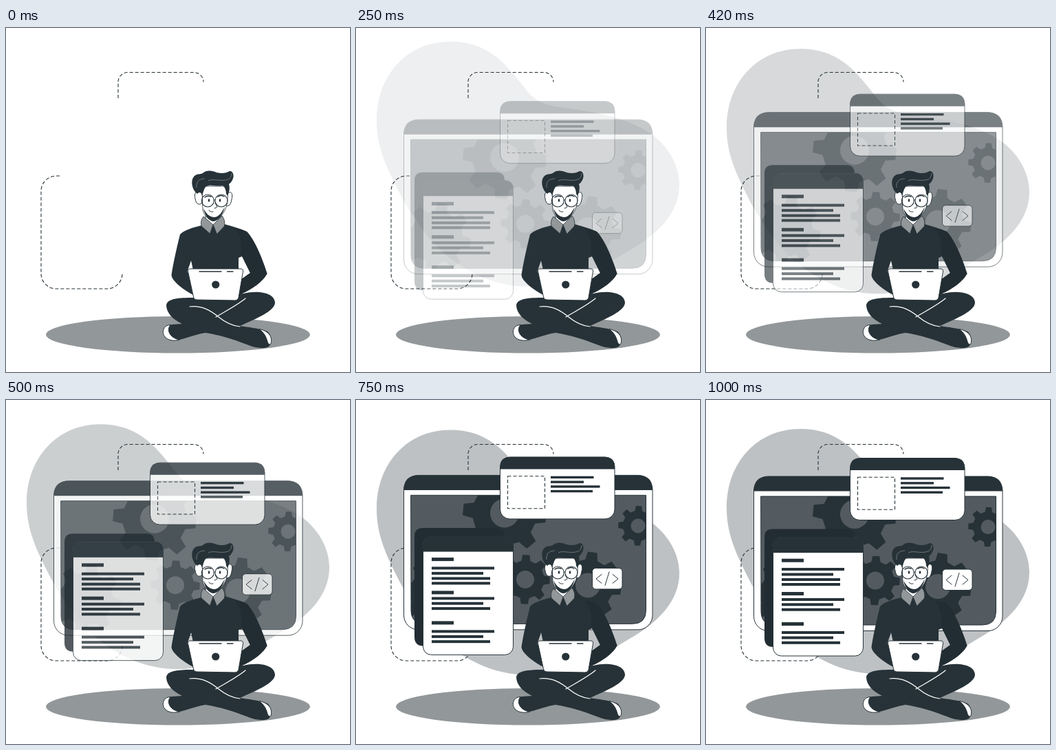
An HTML page for the animation above (1040 ms loop, 500x500 px).

```html
<!DOCTYPE html>
<html lang="en">
<head>
<meta charset="utf-8">
<title>Developer at work</title>
<style>
  html, body { margin: 0; width: 100%; height: 100%; overflow: hidden; background: #fff; }
  svg { display: block; width: 100vw; height: 100vh; }
  .ink { fill: #263238; }
  .shade { fill: #222d33; }
  .line { fill: none; stroke: #263238; stroke-linecap: round; stroke-linejoin: round; }
  .paper { fill: #fff; stroke: #263238; stroke-linejoin: round; }
  .dash { fill: none; stroke: #263238; stroke-width: 1.1; stroke-dasharray: 5 3; }
  .grey { fill: #929799; stroke: #263238; stroke-width: .8; stroke-linejoin: round; }
</style>
</head>
<body>
<svg viewBox="0 0 500 500">
  <defs>
    <clipPath id="screen"><path d="M80 140H421.5V307Q421.5 327 401.5 327H100Q80 327 80 307Z"/></clipPath>
  </defs>

  <g class="drop">
    <path fill="#bec1c3" d="M137 42C190 42 215 72 237 99C256 124 262 132 300 138C340 143 390 151 424 173C453 191 470 222 470 250C470 290 440 322 395 347C350 375 300 398 250 398C205 398 165 380 132 353C105 331 87 302 69 273C48 232 30 200 30 157C30 90 75 42 137 42Z"/>
  </g>

  <path class="dash" d="M163 102V78.500A14 14 0 0 1 177 64.500H273A14 14 0 0 1 287 78.500"/>
  <path class="dash" d="M78 215H73A22 22 0 0 0 51 237V357A22 22 0 0 0 73 379H147A22 22 0 0 0 169 357"/>

  <g class="rise">
    <rect class="paper" x="69.5" y="111" width="361.500" height="224.500" rx="21"/>
    <path class="ink" d="M69.500 132.500V132Q69.500 111 90.500 111H410Q431 111 431 132V132.500Z"/>
    <g clip-path="url(#screen)">
      <rect x="80" y="140" width="342" height="188" fill="#535b60"/>
      <g class="ink" id="gears"></g>
    </g>
    <path class="line" d="M80 140H421.500V307Q421.500 327 401.500 327H100Q80 327 80 307Z"/>
  </g>

  <g class="rise">
    <path class="shade" d="M97 187.500H204Q216 187.500 216 199.500V359H98Q85 359 85 346V199.500Q85 187.500 97 187.500Z"/>
    <rect class="paper" x="97.500" y="199.500" width="131" height="172.500" rx="12"/>
    <path class="ink" d="M97.500 222V211.500Q97.500 199.500 109.500 199.500H216.500Q228.500 199.500 228.500 211.500V222Z"/>
    <g class="ink" id="article"></g>
  </g>

  <g class="rise">
    <rect class="paper" x="209.500" y="84.500" width="166.500" height="90" rx="14"/>
    <path class="ink" d="M209.500 102V98.500Q209.500 84.500 223.500 84.500H362Q376 84.500 376 98.500V102Z"/>
    <rect class="dash" x="220.500" y="112.300" width="54" height="47"/>
    <g class="ink" id="card"></g>
  </g>

  <g class="rise">
    <rect class="paper" x="343.500" y="246" width="43.500" height="30.500" rx="5"/>
    <path class="line" d="M357 255L349 261.500L357 268M368 251.500L362 271M373 255L381 261.500L373 268"/>
  </g>

  <ellipse cx="250" cy="445.700" rx="192" ry="26.800" fill="#929799"/>

  <g id="person">
    <!-- legs -->
    <path class="ink" d="M272 392C252 392 234 393 233 403C233 414 243 424 256 430C246 431 236 430 231 435C226 443 231 452 240 454C256 455 270 446 290 443C310 446 332 453 350 460C364 466 378 467 383 462C387 455 386 446 380 441C366 436 352 435 340 433C365 422 391 411 391 399C390 384 365 381 345 386Z"/>
    <path fill="none" stroke="#fff" stroke-width="1.200" stroke-linecap="round" d="M267 405C285 403 298 411 309 420C320 429 330 433 340 434M348 393C336 403 320 411 305 420"/>
    <path class="paper" d="M239 431.500C228 432 226 443 231 449C236 455 246 455 253 453C240 452 232 440 239 431.500Z"/>
    <path class="paper" d="M368 437.500C380 440 388 447 385 459C383 461 381 459 380 456C378 448 375 443 368 437.500Z"/>

    <!-- sweater -->
    <path class="ink" d="M284 287C271 290 259 294 253 300C248 320 243 342 240.500 359C241 367 255 379 274 389L270 362L263.500 354L269 338L272 352H338V334L343 332L355 356L341 366L336 389C352 383 372 371 379.500 357C373 336 361 307 350 296C339 291 328 288 317 285Z"/>
    <path class="shade" d="M332 291Q342 292 350 296C361 307 373 336 379.500 357C372 371 352 383 336 389L341 366L355 356L342 329Q344 304 332 291Z"/>

    <!-- neck and collar -->
    <path class="paper" d="M290 268H313V280L301 290L290 280Z"/>
    <path class="ink" d="M301 286L296 300H307Z"/>
    <path class="grey" d="M287 274Q282 280 284 288L296.500 299L301 286L306.500 299.500L317.500 288Q319 279 314 273L301 286Z"/>

    <!-- head -->
    <path class="paper" d="M285 240C276 234 273 241 275 248C276 256 281 259 286 253Z"/>
    <path class="paper" d="M321 241C328 235 330 242 328 249C327 257 323 261 318 257Z"/>
    <path class="paper" stroke-width=".8" d="M285 230H322C323 248 322 259 317 267C311 277 306 280 301 280C295 279 288 273 286 264Z"/>
    <path class="ink" d="M287 262C289 273 295 281 302 281C309 280 316 270 318 260C314 267 310 275 302 275C295 274 291 270 287 262Z"/>
    <path class="ink" d="M278 241C270 235 268 222 273 216C277 211 283 213 286 211C291 206 300 207 306 210C314 212 320 211 325 208C331 208 332 216 329 221C327 225 325 226 324 227C326 233 324 240 322 244L320 241C320 236 318 231 315 229C306 231 296 226 290 231C287 235 287 239 285 243C283 238 281 238 278 241Z"/>
    <path fill="none" stroke="#8b9194" stroke-width=".7" d="M277 232C276 223 281 219 289 219M294 222C302 218 311 224 323 220Q328 217 328 211"/>

    <circle class="line" cx="293.300" cy="251" r="9" stroke-width="1.100"/>
    <circle class="line" cx="313" cy="251" r="9" stroke-width="1.100"/>
    <path class="line" d="M302 250Q303.200 248.500 304 250"/>
    <path class="line" stroke-width="1.500" d="M289 246Q293 243 298 245M308 245Q313 242 317 245"/>
    <ellipse class="ink" cx="295" cy="250.500" rx="1.300" ry="2.200"/>
    <ellipse class="ink" cx="311" cy="250.500" rx="1.300" ry="2.200"/>
    <path class="line" d="M304 254L307 260Q306 262 303 262M295 265Q297 268 301 267"/>

    <!-- laptop -->
    <path class="paper" d="M268 350H341Q345 350 344.500 354L338 392Q337 396 333 396L277 395Q273 395 272.500 391L264.500 354Q264 350 268 350Z"/>
    <path class="line" stroke-width="1.300" d="M281 354H313M321.500 354H330"/>
    <circle class="ink" cx="304.700" cy="373" r="5.600"/>
  </g>
</svg>

<script>
  const LOOP = 1040, FPS = 24, TRAVEL = 30, LEAD = 0.018;
  const $ = id => document.getElementById(id);

  // Eight-toothed wheel with a round hole
  function gear(x, y, r, hole, turn) {
    const root = r * 0.77, pts = [];
    for (let i = 0; i < 8; i++) {
      const a = (i * 45 + turn) * Math.PI / 180;
      for (const [d, q] of [[-0.24, root], [-0.14, r], [0.14, r], [0.24, root]])
        pts.push((x + q * Math.cos(a + d)).toFixed(2) + ' ' + (y + q * Math.sin(a + d)).toFixed(2));
    }
    const ring = `M${x - hole} ${y}a${hole} ${hole} 0 1 0 ${2 * hole} 0a${hole} ${hole} 0 1 0 ${-2 * hole} 0Z`;
    return `<path fill-rule="evenodd" d="M${pts.join('L')}Z${ring}"/>`;
  }

  // Bars as [middle y, right edge, height]
  const bars = (x, rows) => rows.map(([y, end, h]) =>
    `<rect x="${x}" y="${y - h / 2}" width="${end - x}" height="${h}"/>`).join('');

  $('gears').innerHTML =
    gear(216, 166, 61, 21, 5) +
    gear(246, 262.5, 36, 13, 2) +
    gear(337, 271, 49, 18, 8) +
    gear(410, 184.5, 29, 10.5, 2) +
    gear(117, 282, 50, 0, 10);

  $('article').innerHTML = bars(110, [
    [233.2, 142, 5],
    [246, 201, 4], [253.5, 185, 4], [261, 195, 4], [268, 195, 4],
    [281.5, 142, 5],
    [290, 201, 4], [297.3, 185, 4], [304.7, 195, 4],
    [325.5, 142, 5],
    [338, 201, 4], [345.5, 185, 4], [352.8, 195, 4]
  ]);

  $('card').innerHTML = bars(283, [
    [114, 345.5, 3.4], [120.8, 331, 3.4], [127.5, 354.5, 3.4], [134.2, 344, 3.4]
  ]);

  const curve = (a, b, u) => 3 * (1 - u) ** 2 * u * a + 3 * (1 - u) * u * u * b + u ** 3;

  // Cubic easing with a slight overshoot
  function ease(x) {
    if (x >= 1) return 1;
    let lo = 0, hi = 1;
    for (let i = 0; i < 30; i++) {
      const mid = (lo + hi) / 2;
      if (curve(0.36, 0.5, mid) < x) lo = mid; else hi = mid;
    }
    return curve(-0.01, 1.38, lo);
  }

  // Steps fall on 24 per second, rounded to 10 ms
  function stepAt(t) {
    let k = 0;
    while (k < FPS && Math.round((k + 1) * 100 / FPS) * 10 <= t) k++;
    return k;
  }

  const rising = document.querySelectorAll('.rise');
  const dropping = document.querySelectorAll('.drop');

  function place(list, y, alpha) {
    for (const g of list) {
      g.setAttribute('transform', `translate(0 ${y.toFixed(3)})`);
      g.setAttribute('opacity', alpha.toFixed(4));
    }
  }

  function draw() {
    const k = stepAt(performance.now() % LOOP);
    const p = k < 2 ? 0 : ease(k / FPS + LEAD);
    const alpha = Math.min(1, Math.max(0, p));
    const shift = TRAVEL * (1 - p);
    place(rising, shift, alpha);
    place(dropping, -shift, alpha);
    requestAnimationFrame(draw);
  }
  draw();
</script>
</body>
</html>
```
